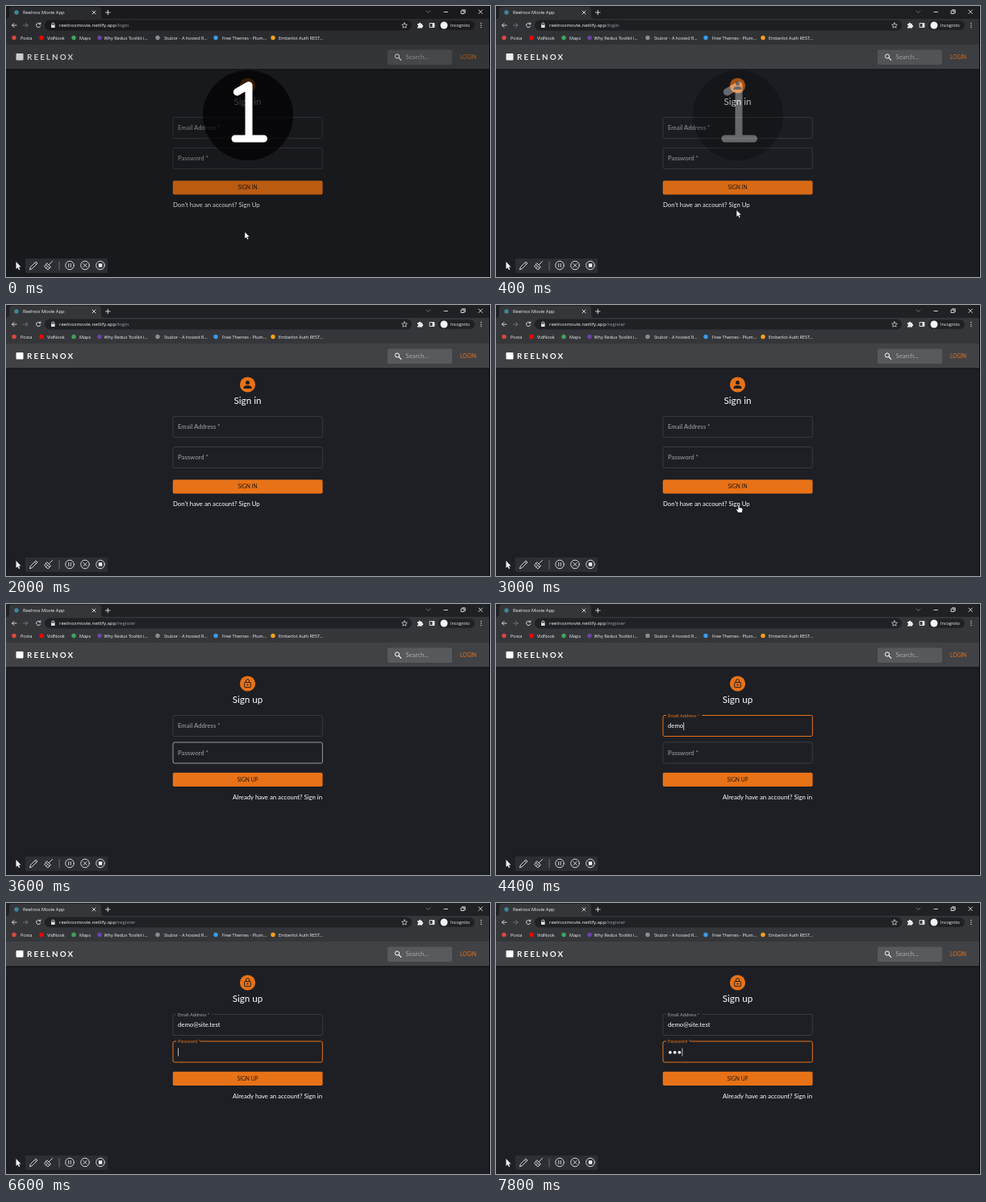
Recreate the animation shown at these times as an HTML page. Size 600 by 337 pixels, loop 8 s.

```html
<!DOCTYPE html>
<html lang="en">
<head>
<meta charset="utf-8">
<title>Movie app sign up</title>
<style>
html, body { margin: 0; width: 100%; height: 100%; overflow: hidden; background: #1d1f24; }
svg { display: block; width: 100%; height: 100%; }
text { font-family: "Open Sans", sans-serif; fill: #f1f3f4; white-space: pre; }
.app { font-family: Lato, sans-serif; font-size: 7.75px; fill: #fff; }
.mid { text-anchor: middle; }
.line { fill: none; stroke: #e4e6ea; stroke-width: .9; stroke-linecap: round; stroke-linejoin: round; }
</style>
</head>
<body>
<svg viewBox="0 0 600 337">
  <rect width="600" height="337" fill="#1d1f24"/>
  <!-- browser bars -->
  <rect width="600" height="17" fill="#202124"/>
  <path d="M0 16Q4 16 4 12V5Q4 1 8 1H114Q118 1 118 5V12Q118 16 122 16H600V48H0Z" fill="#35363a"/>
  <rect x="48" y="17.5" width="455" height="13" rx="6.5" fill="#202124"/>
  <rect x="536" y="18.3" width="45" height="11.5" rx="5.7" fill="#202124"/>
  <!-- site header -->
  <rect y="48" width="600" height="30.5" fill="#414246"/>
  <rect y="78.5" width="600" height="1.5" fill="#15161a"/>
  <rect x="12.5" y="59" width="9" height="8.5" rx="1" fill="#fff"/>
  <text class="app" x="26" y="66.7" style="font-size:9.8px;font-weight:700;letter-spacing:2.1px">REELNOX</text>
  <rect x="473" y="54.5" width="80" height="18.5" rx="2" fill="#58595d"/>
  <circle class="line" cx="485" cy="62.5" r="2.6" style="stroke:#fff;stroke-width:1"/>
  <path class="line" d="M487 64.5l2.8 2.8" style="stroke:#fff;stroke-width:1.1"/>
  <text class="app" x="495.5" y="66.2" style="fill:#a9aaad">Search...</text>
  <text class="app" x="563" y="65.8" style="fill:#e87217;font-size:6.6px">LOGIN</text>
  <g id="page"></g>
  <rect x="599" width="1" height="337" fill="#08080a"/>
  <rect class="count" width="600" height="337" fill-opacity=".2"/>
  <!-- browser controls -->
  <circle cx="13" cy="8" r="2.7" fill="#3f8796"/>
  <text x="21" y="10" font-size="5.8">Reelnox Movie App</text>
  <path class="line" d="M107 6l4 4m0-4l-4 4M123.5 8h5.5m-2.75-2.75v5.5M543 7.5h4.5M564.5 6h3.5v3.5h-3.5zM565.5 4.8h3.7v3.7M586 5l4.5 4.5m0-4.5l-4.5 4.5"/>
  <path class="line" d="M13 24H7.5m2.5-2.5L7.5 24l2.5 2.5M42.5 22.3a2.7 2.7 0 1 0 .3 2.6M42.8 20.8v1.8h-1.8"/>
  <path class="line" style="stroke:#77797d" d="M21.5 24H27m-2.5-2.5L27 24l-2.5 2.5M521 6l2.5 2.5 2.5-2.5"/>
  <path d="M56.8 23.5v-1a1.5 1.5 0 0 1 3 0v1" class="line"/>
  <rect x="56" y="23.4" width="4.6" height="3.6" rx=".5" fill="#dfe1e5"/>
  <text id="url" x="66" y="26.2" font-size="6.15"></text>
  <path class="line" style="stroke-width:.7" d="M494 20.8l1 2.2 2.4.2-1.8 1.6.5 2.4-2.1-1.3-2.1 1.3.5-2.4-1.8-1.6 2.4-.2z"/>
  <path d="M510 22h1.8a1.2 1.2 0 0 1 2.4 0h1.8v1.8a1.2 1.2 0 0 1 0 2.4v1.3h-6v-1.5a1 1 0 0 0 0-2.2z" fill="#e8eaed"/>
  <path class="line" d="M525.5 21.5h5.5v5h-5.5z"/><path d="M528.5 21.5h2.5v5h-2.5z" fill="#e8eaed"/>
  <circle cx="543" cy="24" r="4.5" fill="#f1f3f4"/>
  <text x="551" y="26" font-size="5.5">Incognito</text>
  <g fill="#dfe1e5"><circle cx="589" cy="21.5" r=".7"/><circle cx="589" cy="24" r=".7"/><circle cx="589" cy="26.5" r=".7"/></g>
  <g id="marks" font-size="5.5"></g>
  <!-- recorder tools -->
  <rect x="24" y="314" width="102" height="18" rx="1" fill="#2d2e33"/>
  <path d="M12.5 318v9l2-1.8 1.5 3 1.3-.6-1.5-3h2.7z" fill="#f4f4f4"/>
  <path class="line" d="M29.5 327.5l1-3 6.5-6.5 2 2-6.5 6.5zM35.5 319.5l2 2M57.5 317.5l-4 4M51 320l4.5 4.5-1.5 1.5-4.5-4.5zM49.5 321.5l-2 2.5 4.5 4 2-2M49.5 325.7l1.5-1.2"/>
  <path d="M66 317.5v11" stroke="#8a8b8f" stroke-width=".7"/>
  <g class="line"><circle cx="79" cy="322.5" r="5.3"/><circle cx="98" cy="322.5" r="5.3"/><circle cx="117" cy="322.5" r="5.3"/>
  <path d="M77.7 320.5v4M80.3 320.5v4M96 320.5l4 4m0-4l-4 4"/></g>
  <rect x="114.8" y="320.3" width="4.4" height="4.4" fill="#f4f4f4"/>
  <g id="cursor"></g>
  <g class="count">
    <circle cx="300" cy="136" r="56" fill-opacity=".7"/>
    <path d="M286.3 107l14.7-8.5v66M284 165h35.500" fill="none" stroke="#fff" stroke-width="9" stroke-linecap="round" stroke-linejoin="round"/>
  </g>
</svg>
<script>
const $ = id => document.getElementById(id);
const ORANGE = '#e87217', DARK = '#1d1f24', LOOP = 8000, STEP = 200;
const EMAIL = 'demo@site.test';

// icon x, icon colour, text x, label
$('marks').innerHTML = [
  [10, '#d94a3d', 18, 'Posta'],
  [44, '#f00', 51, 'VidNook'],
  [84, '#3fa45b', 91, 'Maps'],
  [116, '#6b43a8', 121.5, 'Why Redux Toolkit i...'],
  [188, '#8b8d91', 196, 'Stubor - A hosted R...'],
  [260, '#3b9be8', 268, 'Free Themes - Plum...'],
  [331, '#f7a01d', 338, 'Emberlot Auth REST...']
].map(([cx, color, x, label]) =>
  `<circle cx="${cx}" cy="39.5" r="2.7" fill="${color}"/><text x="${x}" y="41.5">${label}</text>`).join('');

// pointer tip: time, x, y
const path = [
  [0, 296, 281], [200, 296, 281], [1000, 310, 107], [1200, 303, 119],
  [2000, 303, 119], [2600, 301, 248], [3200, 301, 248], [3600, 290, 186],
  [4000, 290, 152], [5600, 290, 152], [6000, 290, 186], [LOOP, 290, 186]
];

function pointer(t) {
  const i = path.findIndex(k => k[0] > t);
  const [t0, x0, y0] = path[i - 1], [t1, x1, y1] = path[i];
  const u = (t - t0) / (t1 - t0), e = u * u * (3 - 2 * u);
  return [x0 + (x1 - x0) * e, y0 + (y1 - y0) * e];
}

const write = (s, x, y, style = '', cls = '') =>
  `<text class="app ${cls}" x="${x}" y="${y}" style="${style}">${s}</text>`;

function field(label, y, { value = '', focus, hover, caret, size = 7.75, drop = 15.8 }) {
  const up = focus || value;
  const edge = focus ? ORANGE : hover ? '#eee' : '#4c4e53';
  const color = focus ? ORANGE : '#a3a5a8';
  let s = `<rect x="207" y="${y}" width="185.3" height="26" rx="2" fill="none" stroke="${edge}" stroke-width="${focus ? 1 : .6}"/>`;
  if (up) s += `<rect x="211" y="${y - 1}" width="${label.length * 2.95}" height="2" fill="${DARK}"/>`;
  s += up ? write(label, 213, y + 2, `fill:${color};font-size:5.8px`) : write(label, 213, y + 15.6, `fill:${color}`);
  s += write(value, 213, y + drop, `font-size:${size}px`, 'value');
  if (caret) s += `<path class="caret" d="M0 ${y + 8.5}v10" stroke="#fff" stroke-width=".7"/>`;
  return s;
}

const person = '<circle cx="299.5" cy="96.5" r="2.5"/><path d="M294.5 104v-1.3q0-2.8 5-2.8t5 2.8v1.3z"/>';
const lock = `<g fill="none" stroke="${DARK}"><rect x="295.7" y="97.5" width="7.6" height="6.2" rx=".6"/>
  <path d="M297.4 97.5v-1.7a2.1 2.1 0 0 1 4.2 0v1.7"/></g><circle cx="299.5" cy="100.6" r="1"/>`;

const arrow = '<path d="M0 0v8.3l1.9-1.7 1.4 3 1.4-.6-1.4-3h2.6z" fill="#fff" stroke="#000" stroke-width=".3"/>';
const hand = '<path d="M-.8.8q.8-1.3 1.6 0v3.2l3 .8q1 .3.8 1.5l-.6 3.7h-4.8l-2.3-3.5q.5-1.2 1.6-.3l.7.6z" fill="#fff" stroke="#000" stroke-width=".3"/>';

function draw(t) {
  const [x, y] = pointer(t), join = t >= 3200;
  const passY = join ? 172 : 176.5, buttonY = join ? 209.8 : 217.3;
  const over = (top, height) => y > top && y < top + height;
  const onEmail = over(138.5, 26), onPass = over(passY, 26), onButton = over(buttonY, 17);
  const onTitle = over(113, 12), onLink = !join && over(243, 9);
  const inPass = t >= 6200, inEmail = t >= 4200 && !inPass;
  const typed = t >= 5000 ? 14 : t >= 4800 ? 9 : t >= 4400 ? 4 : 0;
  const dots = t >= 7800 ? 3 : t >= 7200 ? 2 : t >= 7000 ? 1 : 0;
  const word = join ? 'up' : 'in';

  $('url').innerHTML = `reelnoxmovie.netlify.app<tspan fill="#9aa0a6">/${t >= 3000 ? 'register' : 'login'}</tspan>`;
  $('page').innerHTML =
    `<circle cx="299.5" cy="99" r="9.6" fill="${ORANGE}"/><g fill="${DARK}">${join ? lock : person}</g>` +
    write('Sign ' + word, 299.5, 123.2, 'font-size:11.7px', 'mid') +
    field('Email Address *', 138.5, { value: EMAIL.slice(0, typed), focus: inEmail, hover: onEmail, caret: inEmail && t < 5600 }) +
    field('Password *', passY, { value: '•'.repeat(dots), focus: inPass, hover: onPass, caret: inPass && t !== 7600, size: 10, drop: 17 }) +
    `<rect x="206.8" y="${buttonY}" width="185.7" height="17.3" rx="1.8" fill="${onButton ? '#b9590f' : ORANGE}"/>` +
    write(('Sign ' + word).toUpperCase(), 299.5, buttonY + 11, 'fill:#2b1a0e;font-size:6.7px', 'mid') +
    (join ? write('Already have an account? Sign in', 392, 242.6, 'text-anchor:end')
          : write("Don't have an account? Sign Up", 207, 250.2));

  const caret = document.querySelector('.caret');
  if (caret) {
    const text = document.querySelectorAll('.value')[inPass ? 1 : 0];
    caret.setAttribute('transform', `translate(${213.5 + text.getComputedTextLength()})`);
  }

  const hidden = onEmail || onPass || onTitle;
  $('cursor').innerHTML = hidden ? '' : onLink || onButton ? hand : arrow;
  $('cursor').setAttribute('transform', `translate(${x} ${y})`);
  for (const part of document.querySelectorAll('.count')) part.setAttribute('opacity', Math.max(0, 1 - t / 600));
}

let last = -1;
const start = performance.now();
function tick() {
  const t = Math.floor((performance.now() - start) % LOOP / STEP) * STEP;
  if (t !== last) draw(last = t);
  requestAnimationFrame(tick);
}
tick();
</script>
</body>
</html>
```
